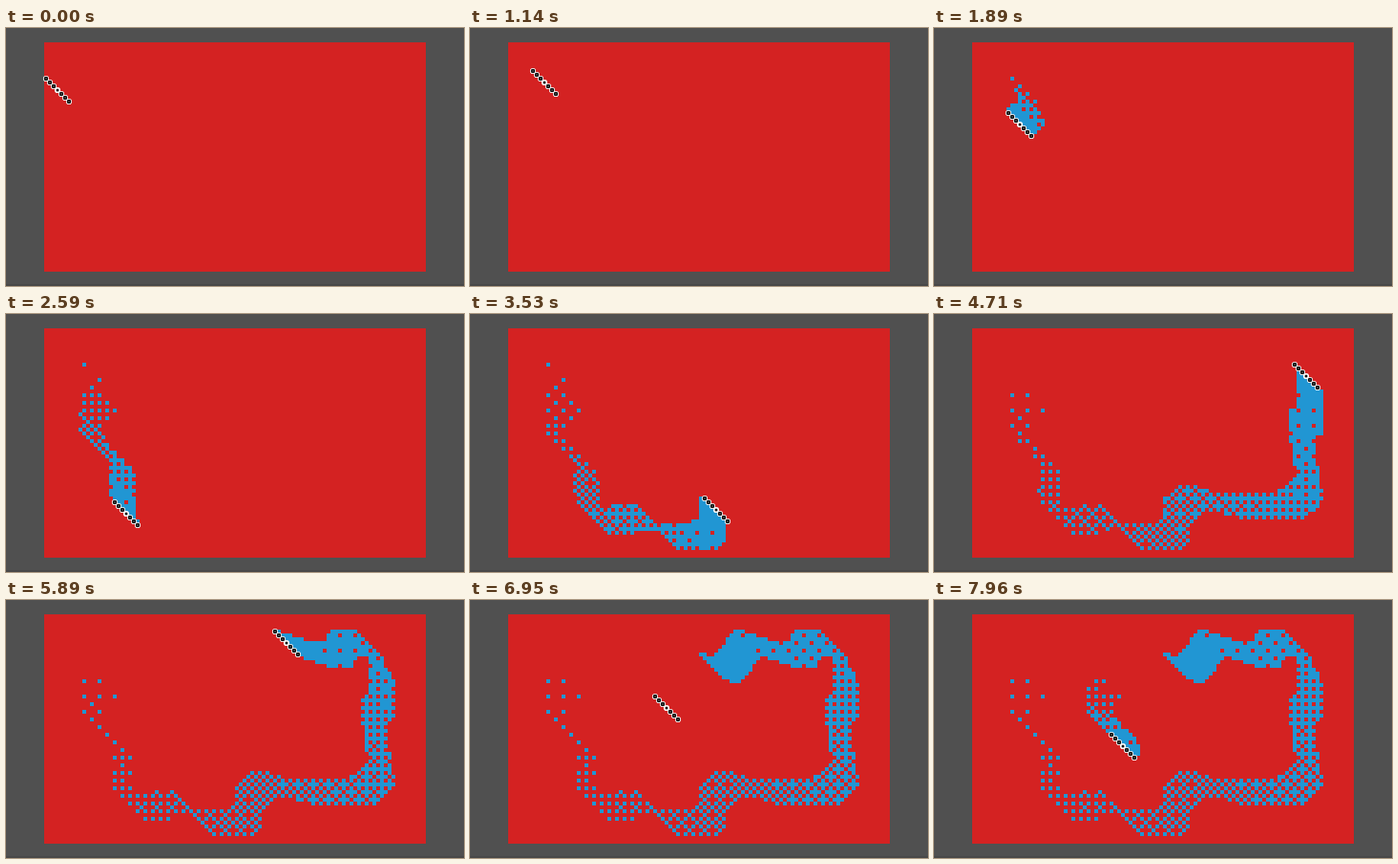
Write an HTML page with a canvas that moves like this. It is 480 px wide and 270 px high and loops after 8000 ms.

```html
<!DOCTYPE html>
<html lang="en">
<head>
<meta charset="utf-8">
<title>Dithered stroke</title>
<style>
  html, body { margin: 0; width: 100%; height: 100%; overflow: hidden; background: #505050; }
  canvas { display: block; width: 480px; height: 270px; }
</style>
</head>
<body>
<canvas id="stage" width="480" height="270"></canvas>
<script>
const LOOP = 8000, TICK = 115.7, PHASE = 40;
const CELL = 4, LEFT = 40, TOP = 15, BRUSH = 7;
const ctx = document.getElementById('stage').getContext('2d');

// Turning points of the pointer: time, then column and row of the brush's upper left end
const approach = [[60, 0, 9], [150, 5, 13], [560, 5, 13], [830, 18, -4], [1080, 6, 7], [1200, 6, 7]];
const longStroke = [
  [1544, 10, 9], [1700, 12, 15], [1790, 9, 18], [2000, 9, 26], [2190, 17, 31],
  [2500, 17, 43], [2585, 18, 45], [2700, 20, 47], [2940, 33, 46], [3080, 38, 51],
  [3290, 47, 51], [3400, 50, 48], [3490, 50, 44], [3640, 54, 41], [3710, 58, 41],
  [3790, 64, 43], [4020, 79, 43], [4150, 85, 38], [4330, 83, 27], [4430, 83, 21],
  [4480, 85, 20], [4600, 85, 11], [4850, 81, 4], [5250, 75, 4], [5340, 74, 7],
  [5500, 69, 7], [5825, 60, 4], [6150, 54, 11], [6350, 50, 10]
];
const travel = [[6460, 50, 10], [6920, 36, 22], [7150, 32, 15]];
const shortStroke = [
  [7400, 32, 15], [7520, 30, 19], [7640, 30, 25], [7780, 37, 27], [7850, 37, 30], [7900, 36, 31]
];
const pointer = [...approach, ...longStroke, ...travel, ...shortStroke];

const between = ([x0, y0], [x1, y1], f) => [Math.round(x0 + (x1 - x0) * f), Math.round(y0 + (y1 - y0) * f)];

function positionAt(time) {
  const next = pointer.findIndex(key => key[0] > time);
  if (next === 0) return pointer[0].slice(1);
  if (next < 0) return pointer[pointer.length - 1].slice(1);
  const [t0, ...from] = pointer[next - 1], [t1, ...to] = pointer[next];
  return between(from, to, (time - t0) / (t1 - t0));
}

// Recursive ordered dither: 0 fills first, 15 last
const quad = (a, b) => a ^ b ? b : 2 + a;
function rank(x, y) {
  const oddX = x & 1, oddY = y & 1;
  const group = quad(oddY, oddX);
  const coarseX = (x + oddX) >> 1 & 1;
  const coarseY = (oddY ? y : oddX ? y - 1 : y + 1) >> 1 & 1;
  const order = quad(coarseX, coarseY);
  return group * 4 + (group === 3 ? 3 - order : order);
}

// Every cell the brush's upper left end has passed through by the given time
function stampsUntil(keys, time) {
  const end = Math.min(time, keys[keys.length - 1][0]);
  const points = keys.filter(key => key[0] <= end).map(key => key.slice(1));
  points.push(positionAt(end));
  const stamps = [points[0]];
  for (let n = 1; n < points.length; n++) {
    const [from, to] = [points[n - 1], points[n]];
    const steps = Math.max(Math.abs(to[0] - from[0]), Math.abs(to[1] - from[1]));
    for (let s = 1; s <= steps; s++) stamps.push(between(from, to, s / steps));
  }
  return stamps;
}

// Density rises from nothing at the start of the stroke to solid at its head
function drawStroke(keys, time) {
  if (time < keys[0][0]) return;
  const stamps = stampsUntil(keys, time);
  ctx.fillStyle = '#2196d3';
  stamps.forEach(([col, row], n) => {
    const level = 16 * (n + 1) / stamps.length;
    const fill = (x, y) => {
      if (level > rank(x, y) + 0.13) ctx.fillRect(LEFT + x * CELL, TOP + y * CELL, CELL, CELL);
    };
    const [lastCol, lastRow] = stamps[Math.max(0, n - 1)];
    const sideways = (col - lastCol) * (row - lastRow) < 0;
    for (let d = 0; d < BRUSH; d++) {
      fill(col + d, row + d);
      // Close the gap left by a step across the brush
      if (sideways) fill(col + d, lastRow + d);
    }
  });
}

function dot(x, y, radius, color) {
  ctx.fillStyle = color;
  ctx.beginPath();
  ctx.arc(x, y, radius, 0, 2 * Math.PI);
  ctx.fill();
}

function drawCursor([col, row]) {
  const each = draw => {
    for (let d = 0; d < BRUSH; d++) {
      draw(LEFT + (col + d + 0.5) * CELL, TOP + (row + d + 0.5) * CELL, d === 3);
    }
  };
  each((x, y) => dot(x, y, 3.1, '#fff'));
  each((x, y, middle) => dot(x, y, middle ? 1.5 : 2.3, '#111'));
  each((x, y, middle) => middle || dot(x, y, 1, '#444'));
}

function frame(now) {
  const time = Math.max(0, Math.floor((now % LOOP - PHASE) / TICK) * TICK + PHASE);
  ctx.fillStyle = '#505050';
  ctx.fillRect(0, 0, 480, 270);
  ctx.fillStyle = '#484848';
  ctx.fillRect(0, 268, 480, 2);
  ctx.fillStyle = '#d42222';
  ctx.fillRect(LEFT, TOP, 400, 240);
  drawStroke(longStroke, time);
  drawStroke(shortStroke, time);
  drawCursor(positionAt(time));
  requestAnimationFrame(frame);
}
requestAnimationFrame(frame);
</script>
</body>
</html>
```
